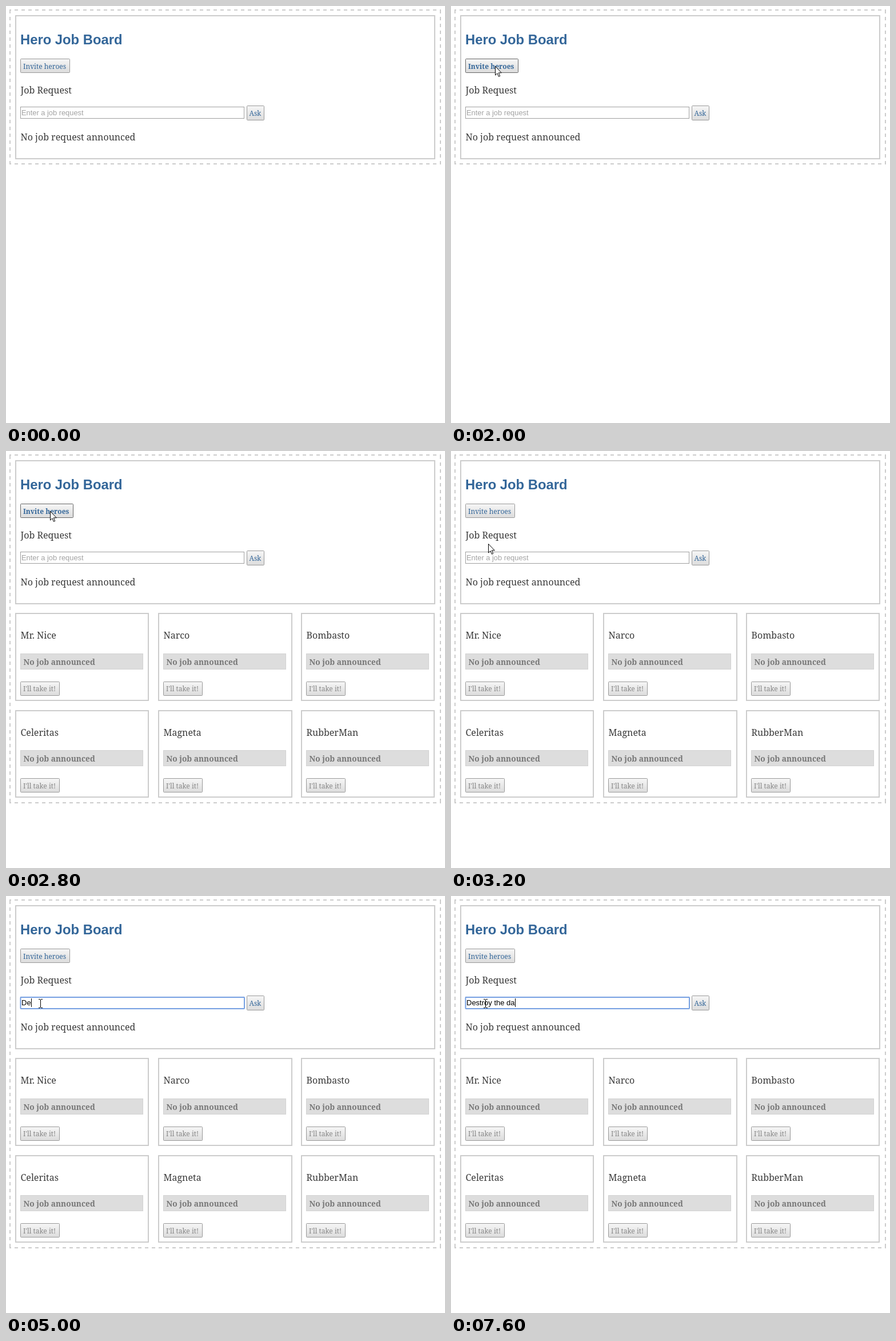
Animation of 768 by 729 pixels, one loop 8000 ms. Source, as an HTML page:

```html
<!DOCTYPE html>
<html lang="en">
<head>
<meta charset="utf-8">
<title>Hero Job Board</title>
<style>
html, body { margin: 0; width: 100%; height: 100%; overflow: hidden; background: #fff; }
svg { display: block; width: 768px; height: 729px; }
text { font: 16px "Noto Serif", serif; fill: #3a3a3a; }
.title { font: bold 23.8px "Liberation Sans", Arial, sans-serif; fill: #369; }
.btn text { font-size: 12px; fill: #369; }
.btn rect { fill: url(#up); stroke: #999; }
.off text { fill: #888; }
.hover text { font-weight: bold; }
.hover rect { stroke: #666; }
.down rect { fill: url(#press); stroke: #999; }
.frame { fill: none; stroke: #ccc; stroke-width: 2; }
.dash { stroke-dasharray: 6; }
.bar { fill: #ddd; stroke: #d2d2d2; }
.job { font-size: 13.7px; font-weight: bold; fill: #777; }
.field { fill: #fff; stroke: #a0a0a0; }
.focus { fill: none; stroke: #76a0e2; stroke-width: 2; }
.hint, .typed { font: 13px "Liberation Sans", Arial, sans-serif; fill: #000; }
.hint { font-size: 12.85px; fill: #a3a3a3; }
</style>
</head>
<body>
<svg viewBox="0 0 768 729">
  <defs>
    <linearGradient id="up" x2="0" y2="1"><stop stop-color="#f6f6f6"/><stop offset="1" stop-color="#dcdcdc"/></linearGradient>
    <linearGradient id="press" x2="0" y2="1"><stop stop-color="#dcdcdc"/><stop offset="1" stop-color="#f6f6f6"/></linearGradient>
  </defs>
  <g id="outer"></g>
  <rect class="frame" x="17" y="17" width="733" height="250"/>
  <text class="title" x="25" y="67">Hero Job Board</text>
  <g class="btn" id="invite">
    <rect x="25.5" y="92.5" width="86" height="24" rx="1"/>
    <text x="30" y="109.500">Invite heroes</text>
  </g>
  <text x="25.500" y="153">Job Request</text>
  <rect class="field" x="25.5" y="176.5" width="391" height="20"/>
  <rect class="focus" id="focus" x="25.5" y="177" width="391.500" height="20" rx="1"/>
  <text class="hint" id="hint" x="27" y="191">Enter a job request</text>
  <text class="typed" id="typed" x="27" y="191" xml:space="preserve"></text>
  <rect id="caret" y="179" width="1" height="15"/>
  <g class="btn">
    <rect x="421.5" y="174.5" width="30" height="25" rx="1"/>
    <text x="425.500" y="192">Ask</text>
  </g>
  <text x="25.500" y="235">No job request announced</text>
  <g id="cards"></g>
  <path id="arrow" d="M.5 .5V16L4 12.700L6.400 18.400L8.700 17.400L6.300 11.800H11.300Z" fill="#fff" stroke="#000"/>
  <path id="beam" d="M-3 -7.500H-1L.5 -6.500L2 -7.500H4M.5 -6.500V6.500M-3 7.500H-1L.5 6.500L2 7.500H4" fill="none" stroke="#000"/>
</svg>
<script>
const $ = id => document.getElementById(id);
const show = (id, on) => $(id).setAttribute('visibility', on ? 'visible' : 'hidden');

const LOOP = 8000;
const TEXT = 'Destroy the da';

// time, x, y, shape
const pointer = [
  [800, 68, 188, 'beam'], [1000, 69, 168, 'arrow'], [1200, 72, 146, 'beam'],
  [1400, 74, 127, 'arrow'], [1600, 76, 114, 'arrow'], [1800, 76, 107, 'arrow'],
  [2000, 77, 105, 'arrow'], [3000, 74, 120, 'arrow'], [3200, 65, 162, 'arrow'],
  [3400, 60, 188, 'beam']
];

// time, letters typed so far
const typing = [
  [0, 0], [4800, 1], [5000, 2], [5200, 3], [5400, 4], [5600, 5], [6000, 6],
  [6200, 7], [6400, 8], [6600, 10], [6800, 11], [7200, 12], [7400, 13], [7600, 14]
];

const latest = (steps, t) => steps.filter(s => s[0] <= t).pop();

function dashedBox(bottom, offset) {
  const side = (d, shift) => `<path class="frame dash" stroke-dashoffset="${shift}" d="${d}"/>`;
  const corner = (x, y) => `<rect x="${x}" y="${y}" width="2" height="2" fill="#ccc"/>`;
  const b = bottom - 1;
  return side('M8 7H759', 5) + side(`M8 ${b}H759`, 5) +
    side(`M7 8V${b - 1}`, offset) + side(`M760 8V${b - 1}`, offset) +
    corner(6, 6) + corner(759, 6) + corner(6, b - 1) + corner(759, b - 1);
}

function card(name, i) {
  const x = i % 3 * 250, row = Math.floor(i / 3);
  const dy = row * 170, by = row * 169;
  return `<g transform="translate(${x})">
    <rect class="frame" x="17" y="${284 + dy}" width="${i % 3 === 1 ? 233 : 232}" height="${152 - row}"/>
    <text x="25.5" y="${328 + dy}">${name}</text>
    <rect class="bar" x="25.5" y="${354.5 + by}" width="214" height="27"/>
    <text class="job" x="30.5" y="${374 + by}">No job announced</text>
    <g class="btn off">
      <rect x="25.5" y="${403.5 + by}" width="68" height="24" rx="1"/>
      <text x="30" y="${420 + dy}">I'll take it!</text>
    </g></g>`;
}

$('cards').innerHTML =
  ['Mr. Nice', 'Narco', 'Bombasto', 'Celeritas', 'Magneta', 'RubberMan'].map(card).join('');

let shown = -1;

function draw(t) {
  const step = Math.floor(t / 200) * 200;
  if (step === shown) return;
  shown = step;

  const invited = step >= 2800;
  $('outer').innerHTML = invited ? dashedBox(616, 0) : dashedBox(277, 1);
  show('cards', invited);

  const hover = step >= 1600 && step < 3000;
  $('invite').setAttribute('class', 'btn' + (hover ? ' hover' : '') + (step === 2600 ? ' down' : ''));
  $('invite').firstElementChild.setAttribute('width', hover ? 92 : 86);

  const count = latest(typing, step)[1];
  $('typed').textContent = TEXT.slice(0, count);
  show('hint', !count);
  show('focus', step >= 3800);
  show('caret', step >= 3800 && (step < 4400 || count));
  $('caret').setAttribute('x', 27 + (count ? Math.ceil($('typed').getComputedTextLength()) : 0));

  const [, x, y, shape] = latest(pointer, step) || [];
  for (const id of ['arrow', 'beam']) {
    show(id, id === shape);
    if (id === shape) $(id).setAttribute('transform', `translate(${x} ${y})`);
  }
}

function tick() {
  draw(performance.now() % LOOP);
  requestAnimationFrame(tick);
}
draw(0);
requestAnimationFrame(tick);
</script>
</body>
</html>
```
